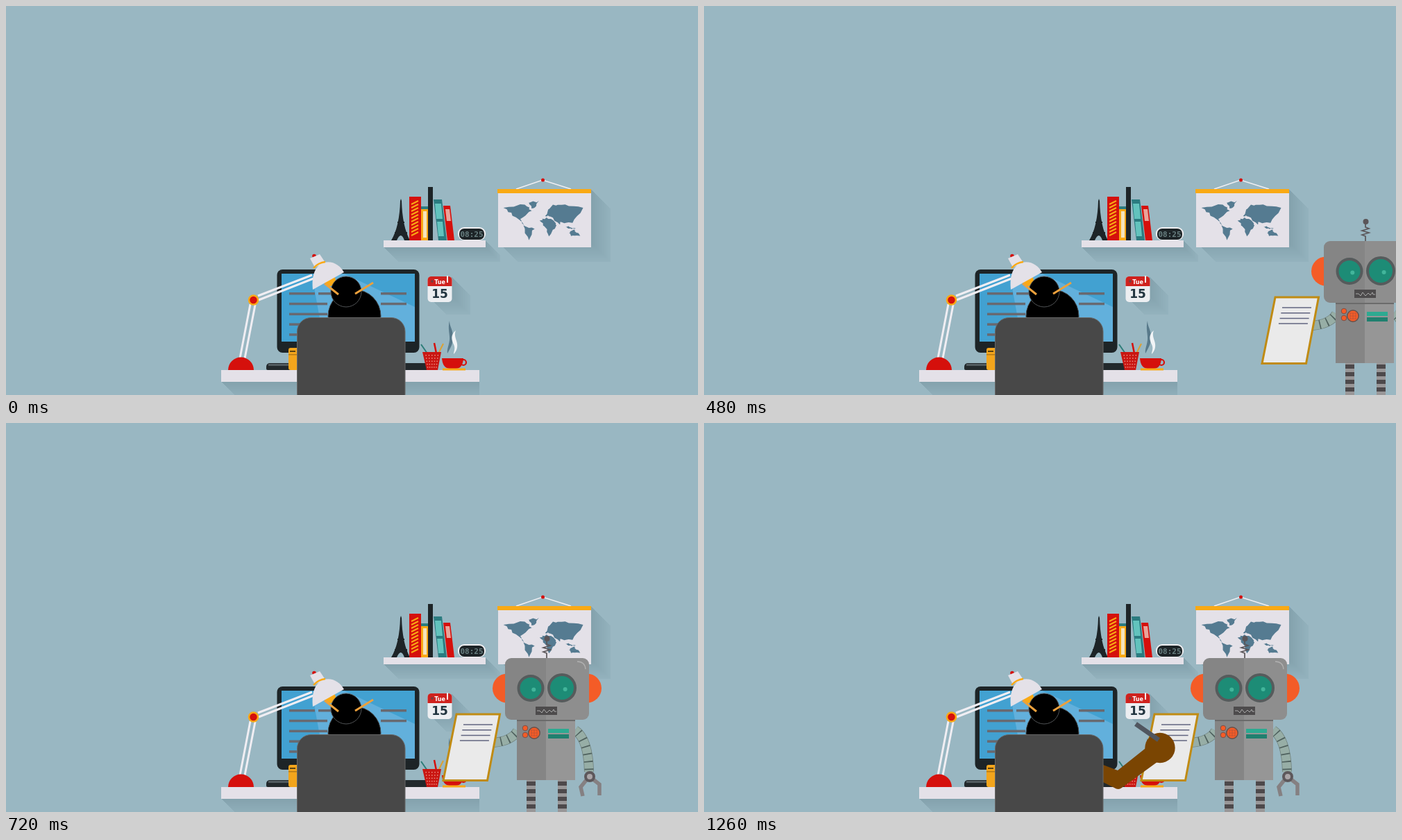
Recreate the animation shown at these times as an HTML page with a canvas. Size 997 by 561 pixels, loop 1.29 s.

```html
<!DOCTYPE html>
<html lang="en">
<head>
<meta charset="utf-8">
<title>Desk visit</title>
<style>
html, body { margin: 0; width: 100%; height: 100%; overflow: hidden; background: #99b7c2; }
canvas { display: block; }
</style>
</head>
<body>
<canvas id="stage" width="997" height="561"></canvas>
<script>
const ctx = document.getElementById('stage').getContext('2d');
const LOOP = 1290, STEP = 30;
const WALL = '#99b7c2', PAPER = '#e4e1e8', RED = '#d5100c', ORANGE = '#f9a915';
const DARK = '#1d2427', TEAL = '#2b7c80', MINT = '#62c3bd', EAR = '#f45c27';

function paint(path, fill, stroke, width = 1) {
  if (fill) { ctx.fillStyle = fill; ctx.fill(path); }
  if (stroke) { ctx.strokeStyle = stroke; ctx.lineWidth = width; ctx.stroke(path); }
}
const shape = (d, fill, stroke, width) => paint(new Path2D(d), fill, stroke, width);
const line = (d, color, width) => shape(d, null, color, width);

function rect(x, y, w, h, fill) {
  ctx.fillStyle = fill;
  ctx.fillRect(x, y, w, h);
}
function rounded(x, y, w, h, r, fill, stroke, width) {
  const p = new Path2D();
  p.roundRect(x, y, w, h, r);
  paint(p, fill, stroke, width);
}
function circle(x, y, r, fill, stroke, width) {
  const p = new Path2D();
  p.arc(x, y, r, 0, Math.PI * 2);
  paint(p, fill, stroke, width);
}
function text(s, x, y, font, color) {
  ctx.font = font;
  ctx.fillStyle = color;
  ctx.textAlign = 'center';
  ctx.fillText(s, x, y);
}
function shifted(dx, drawPart) {
  ctx.save();
  ctx.translate(dx, 0);
  drawPart();
  ctx.restore();
}
// Diagonal long shadow: stacked copies that fade with distance.
function shadow(x, y, w, h, depth) {
  for (let i = depth; i > 0; i--)
    rect(x + i, y + i, w, h, `hsl(196 ${20 + 4 * i / depth}% ${59.5 + 6.5 * i / depth}%)`);
}
// Upright block whose foot is shifted sideways by lean.
const slab = (x, y, w, h, lean, fill) =>
  shape(`M${x} ${y}h${w}l${lean} ${h}h${-w}Z`, fill);

function seeded(seed) {
  return () => (seed = seed * 16807 % 2147483647) / 2147483647;
}
// Closed outline through a few corners, roughened like a coast.
function coast(corners, random) {
  const points = corners.split(' ').map(p => p.split(',').map(Number));
  const path = new Path2D(), parts = 4, jitter = () => (random() - 0.5) * 3;
  points.forEach(([x, y], i) => {
    const [nx, ny] = points[(i + 1) % points.length];
    for (let k = 0; k < parts; k++)
      path.lineTo(x + (nx - x) * k / parts + jitter(), y + (ny - y) * k / parts + jitter());
  });
  return path;
}
const random = seeded(77);
const continents = [
  '718,292 748,285 757,295 742,307 748,317 731,302',
  '752,283 768,282 759,293',
  '746,317 761,321 752,338',
  '776,302 787,288 805,286 833,292 815,313 800,312 797,315 784,304',
  '770,309 777,305 788,309 794,316 783,331 777,319',
  '811,326 819,323 826,331 813,331',
  '805,318 821,321 815,322'
].map(corners => coast(corners, random));

function drawMap() {
  shadow(709, 264, 134, 77, 28);
  line('M735 264L773 251 814 264', '#f0eff3', 1.5);
  circle(773.5, 251, 2.5, RED);
  rect(709, 265, 134, 83, PAPER);
  rect(708, 264, 135, 6, ORANGE);
  continents.forEach(land => paint(land, '#557b91'));
}

function drawShelf() {
  shadow(544, 338, 147, 10, 21);
  rect(544, 338, 147, 10, PAPER);

  shape('M568 281L569 278 570 281Q571 318 582 338H574Q569 324 563 338H555Q567 318 568 281Z', DARK);
  rect(564, 311, 10, 2, DARK);
  rect(560, 326, 18, 3, DARK);

  slab(581, 275, 17, 63, 0, RED);
  for (let y = 284; y < 331; y += 5) line(`M584 ${y + 2}L594 ${y - 3}`, ORANGE, 2);
  slab(598, 289, 10, 49, 0, ORANGE);
  slab(598, 289, 10, 4, 0, TEAL);
  slab(601, 296, 5, 38, 0, '#f4e4bd');
  slab(608, 261, 7, 77, 0, DARK);
  slab(616, 279, 12, 59, 7, TEAL);
  slab(618, 285, 9, 22, 2, MINT);
  slab(621, 311, 8, 21, 2, MINT);
  slab(630, 288, 10, 50, 6, RED);
  slab(633, 293, 6, 17, 2, '#eaa39a');

  rounded(651, 319, 40, 19, 9, '#f0f0f2');
  rounded(653, 321, 36, 16, 7, DARK);
  text('08:25', 671, 333, 'bold 11px "DejaVu Sans Mono", monospace', '#687f80');
}

function drawCalendar() {
  shadow(607, 390, 35, 28, 27);
  rounded(607.5, 390, 35, 37, 5, '#eceef1');
  rounded(607.5, 390, 35, 14, [5, 5, 0, 0], '#cf211d');
  circle(614, 397, 2, '#7e3b3d');
  rect(635, 389, 2, 10, '#f5eeee');
  text('Tue', 625, 401, 'bold 8px "DejaVu Sans", sans-serif', '#fff');
  text('15', 625, 421, 'bold 17px "DejaVu Sans", sans-serif', '#21343f');
}

function drawMonitor() {
  rounded(390.5, 380, 205, 120, 8, DARK);
  rect(397, 386, 192, 98, '#42a1d1');
  shape('M442 395L487 386 589 434V484H458Z', '#62b0dc');
  for (let row = 0; row < 5; row++) {
    const y = 413 + row * 14.8;
    rect(408, y, 37, 3.5, '#686970');
    rect(row ? 445 : 450, y, 18, 3.5, '#686970');
    if (row < 2) rect(540, y, 37, 3.5, '#686970');
  }
}

function drawLamp() {
  line('M352 430L337 508M359 431L344 508M363 418L441 388M364 424L443 393', '#f0eef3', 3);
  shape('M320 525A18.5 18.5 0 0 1 357 525Z', RED);
  circle(356.5, 424, 6.5, RED, ORANGE, 2.5);
  circle(467, 396, 8, ORANGE);
  circle(444, 360.5, 2.8, RED);
  shape('M438 364L452 358 460 370 445 377Z', PAPER);
  shape('M442 409C440 391 444 375 458 370C471 367 481 374 487 384Z', PAPER);
  line('M443 378Q450 370 460 369', ORANGE, 2.5);
}

function drawCup() {
  shape('M639 454C636 465 640 474 639 482S635 495 636 501C641 492 645 485 644 475S639 462 639 454Z', '#58798a');
  shape('M648 468C640 474 642 482 645 488S645 498 645 502C651 496 651 489 649 483S646 473 648 468Z', '#f1f4f6');
  circle(659, 514, 4, null, RED, 2.2);
  shape('M628 508H659Q658 523 648 523H639Q629 522 628 508Z', RED);
  slab(629, 522.5, 33, 3, 0, ORANGE);
}

function drawPencils() {
  line('M598 488L607 501', '#2d7d78', 2);
  line('M617 486L620 501', RED, 2.5);
  line('M630 487L623 501', '#dda130', 2);
  shape('M600 499H627L622 525H606Z', '#c91612');
  for (let row = 0; row < 5; row++)
    for (let i = -2; i <= 2; i++)
      rect(613 + i * (4.3 - row * 0.3), 503 + row * 4.3, 1.5, 1.5, '#ed8c80');
}

function drawDesk() {
  shadow(310, 525, 372, 17, 25);
  rect(682, 525, 30, 36, WALL);
  rect(310, 525, 372, 17, PAPER);
  rounded(375, 515, 236, 10, [5, 5, 2, 2], '#22292c');
  rect(378, 516, 30, 3, '#525c60');

  rounded(407, 493, 16, 32, 3, '#f3a51c');
  rect(409, 497, 8, 2, '#5a4312');
  rect(407, 502, 14, 1.5, '#b47a16');
  drawPencils();
  drawCup();
}

function drawEye(x, y, r) {
  circle(x, y, r - 2, '#1d8c76', '#565b5c', 4);
  circle(x + r * 0.22, y + r * 0.1, 3, '#42b59b');
}

// Ridged limb: a pale tube with dark rings across it.
function drawTube(d) {
  line(d, '#6e7f7a', 14);
  line(d, '#97aea6', 12.5);
  ctx.setLineDash([1.7, 9.3]);
  ctx.lineDashOffset = -6;
  line(d, '#4f615e', 13);
  ctx.setLineDash([]);
}

function drawHead() {
  line('M779 312V319L784 321 774 324 784 327 774 330 779 332V340', '#5a5558', 1.7);
  circle(779.5, 311, 4, '#5a5558');
  circle(722, 382.5, 21, EAR);
  circle(837, 382.5, 21, EAR);
  rounded(719, 339, 60, 89, [9, 0, 0, 9], '#858585');
  rounded(778, 339, 62, 89, [0, 9, 9, 0], '#8e8e8e');
  line('M823 344Q834 344 835 355', '#b1b1b1', 1.3);
  drawEye(756, 382.5, 19.5);
  drawEye(801, 382, 21);
  rect(763, 409, 31, 12, '#4d4b4c');
  line('M765 415h4l3 3 3-5 4 5 4-4 3 3 3-4 1 3h3', '#aaa', 1);
}

function drawBody() {
  for (const x of [750, 795]) {
    rect(x, 515, 13, 46, '#999798');
    for (let y = 517; y < 561; y += 11) rect(x, y, 13, 6, '#4d494b');
  }
  drawTube('M737 444Q728 459 702 461');
  drawTube('M820 443Q839 456 840 503');
  line('M836 515L828 525 831 538M846 514L855 521 855 537', '#858082', 5.5);
  circle(841, 510, 6, '#aaa5a7', '#5d585b', 4);

  rect(736, 428, 42, 87, '#858585');
  rect(778, 428, 42, 87, '#969696');
  rect(736, 427, 84, 3, '#6b6b6b');
  for (const y of [440, 450]) circle(748, y, 3.8, EAR, '#795049', 1);
  circle(761, 447, 8.2, EAR, '#67504a', 1.5);
  for (let i = -4; i <= 4; i += 4) line(`M756 ${447 + i}h10M${761 + i} 442v10`, '#bd5335', 0.8);
  rect(781, 441, 30, 6, '#2daa91');
  rect(781, 449, 30, 6, '#20806f');
}

function drawClipboard() {
  shape('M649 420H711.5L693.5 515.5H630Z', '#eaeaea', '#c08b13', 3);
  for (let i = 0; i < 4; i++) line(`M${659 - i * 1.7} ${435 + i * 7.7}h42`, '#60647f', 1.5);
}

function drawRobot() {
  drawBody();
  drawHead();
  drawClipboard();
}

function drawArm() {
  shape('M540 480L575 493 596 501 640 466 657 486 602 526Q597 530 591 526L575 518 540 504Z', '#7a4502');
  circle(657, 468.5, 21.7, '#7a4502');
  line('M622 434L655 457', '#50565f', 7);
}

function drawSitter() {
  circle(502, 447, 38, '#000', '#4a4d4f', 1);
  circle(490, 412, 22, '#000', '#515456', 1);
  line('M459 400L479 416M503 415L529 399', '#eca13c', 3);
}

function draw(t) {
  rect(0, 0, 997, 561, WALL);
  drawMap();
  drawShelf();
  drawCalendar();
  drawMonitor();
  drawDesk();
  drawLamp();
  drawSitter();

  shifted(Math.max(0, Math.floor(564.5 - t * 0.8125)), drawRobot);
  const reach = Math.min(1, Math.max(0, (t - 800) / 230));
  if (reach) shifted(108 * (reach - 1), drawArm);
  rounded(419.5, 449.5, 155.5, 130, 20, '#484848', '#686868', 1);
}

function tick() {
  const t = performance.now() % LOOP;
  draw(Math.floor(t / STEP) * STEP);
  requestAnimationFrame(tick);
}
tick();
</script>
</body>
</html>
```
